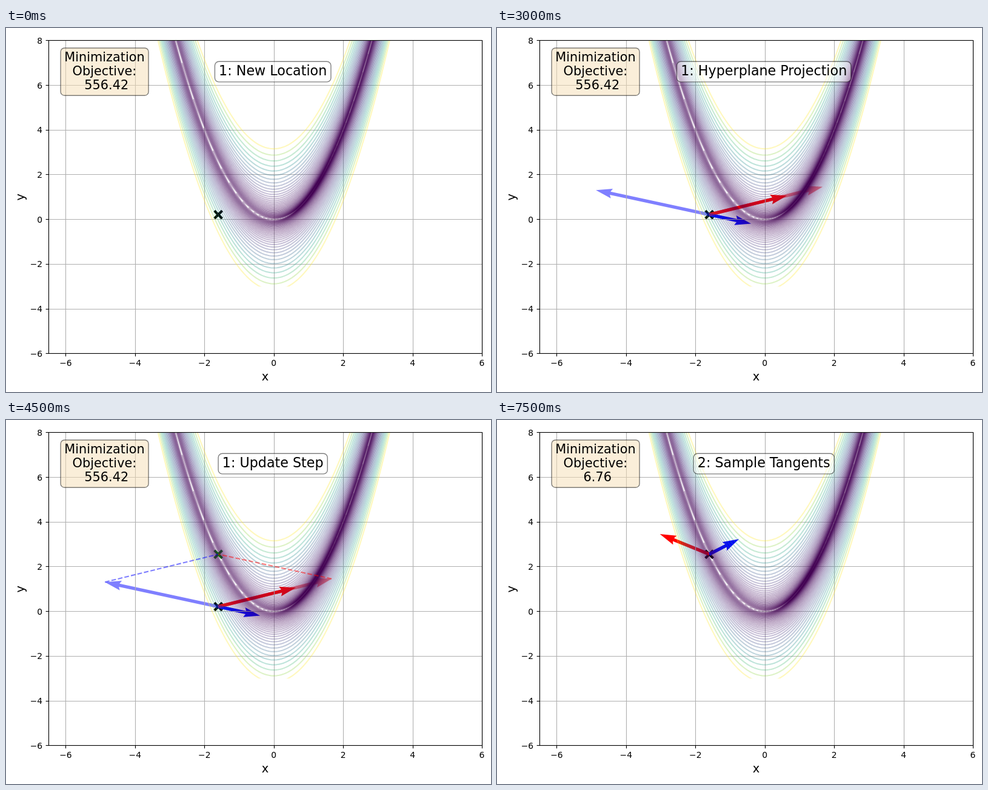
An HTML page with a canvas that plays this animation: 800x600 px, repeating every 8 s.

```html
<!DOCTYPE html>
<html lang="en">
<head>
<meta charset="utf-8">
<title>Hyperplane projection steps</title>
<style>
  html, body { margin: 0; width: 100%; height: 100%; overflow: hidden; background: #fff; }
  canvas { display: block; }
</style>
</head>
<body>
<canvas id="stage" width="800" height="600"></canvas>
<script>
const W = 800, H = 600, LOOP = 8000, STEP = 1500;
const PT = 100 / 72;
const FONT = '"DejaVu Sans", sans-serif';
const box = { left: 69.8, right: 785, top: 20.75, bottom: 536.75 };
const px = x => box.left + (x + 6.5) / 12.5 * (box.right - box.left);
const py = y => box.bottom - (y + 6) / 14 * (box.bottom - box.top);
const snapX = x => Math.floor(x + 0.5) + 0.5;
const snapY = y => Math.floor(y) + 0.5;

const ctx = document.getElementById('stage').getContext('2d');

const VIRIDIS = [
  [68, 1, 84], [71, 45, 123], [59, 82, 139], [44, 114, 142], [33, 145, 140],
  [40, 174, 128], [94, 201, 98], [173, 220, 48], [253, 231, 37]
];

function viridis(v) {
  const s = v * (VIRIDIS.length - 1);
  const i = Math.min(VIRIDIS.length - 2, Math.floor(s));
  const mix = VIRIDIS[i].map((c, k) => Math.round(c + (VIRIDIS[i + 1][k] - c) * (s - i)));
  return `rgb(${mix})`;
}

function line(c, x1, y1, x2, y2) {
  c.beginPath();
  c.moveTo(x1, y1);
  c.lineTo(x2, y2);
  c.stroke();
}

function label(c, str, x, y, pt, align = 'center') {
  c.font = `${pt * PT}px ${FONT}`;
  c.textAlign = align;
  c.fillStyle = '#000';
  c.fillText(str, x, y);
}

function drawGrid(c) {
  c.strokeStyle = '#b0b0b0';
  c.lineWidth = 0.8 * PT;
  for (let v = -6; v <= 6; v += 2) {
    const x = snapX(px(v)), y = snapY(py(v));
    line(c, x, box.top, x, box.bottom);
    line(c, box.left, y, box.right, y);
  }
}

// Level sets of (1-x)^2 + 100(y-x^2)^2, traced by angle.
function drawContours(c) {
  const count = 50, samples = 3000;
  c.save();
  c.beginPath();
  c.rect(box.left, box.top, box.right - box.left, py(-3) - box.top);
  c.clip();
  c.globalAlpha = 0.3;
  c.lineWidth = 1.5 * PT;
  c.lineJoin = 'round';
  for (let i = 0; i < count; i++) {
    const level = 10 ** (-1 + 4 * i / (count - 1));
    const r = Math.sqrt(level);
    c.strokeStyle = viridis(level / 1000);
    c.beginPath();
    let drawing = false;
    for (let k = 0; k <= samples; k++) {
      const a = k / samples * 2 * Math.PI;
      const x = 1 + r * Math.cos(a);
      if (Math.abs(x) > 4.5) { drawing = false; continue; }
      const X = px(x), Y = py(x * x + r / 10 * Math.sin(a));
      if (drawing) c.lineTo(X, Y); else c.moveTo(X, Y);
      drawing = true;
    }
    c.stroke();
  }
  c.restore();
}

function drawAxes(c) {
  const l = snapX(box.left), r = snapX(box.right);
  const t = snapY(box.top), b = snapY(box.bottom);
  const tick = 3.5 * PT;
  const name = v => String(v).replace('-', '\u2212');
  c.strokeStyle = '#000';
  c.lineWidth = 0.8 * PT;
  c.strokeRect(l, t, r - l, b - t);
  for (let v = -6; v <= 8; v += 2) {
    const y = snapY(py(v));
    line(c, l - tick, y, l, y);
    label(c, name(v), 60.1, py(v) + 5.1, 10, 'right');
    if (v > 6) continue;
    const x = snapX(px(v));
    line(c, x, b, x, b + tick);
    label(c, name(v), px(v), 557, 10);
  }
  label(c, 'x', 427.4, 581, 14);
  c.save();
  c.translate(29.5, 278.8);
  c.rotate(-Math.PI / 2);
  label(c, 'y', 0, 0, 14);
  c.restore();
}

function makePlot() {
  const layer = document.createElement('canvas');
  layer.width = W;
  layer.height = H;
  const c = layer.getContext('2d');
  drawGrid(c);
  drawContours(c);
  drawAxes(c);
  return layer;
}

function cross(p, color) {
  const s = 6.4;
  ctx.strokeStyle = color;
  ctx.lineWidth = 3 * PT;
  line(ctx, p.x - s, p.y - s, p.x + s, p.y + s);
  line(ctx, p.x - s, p.y + s, p.x + s, p.y - s);
}

function arrow(p, [dx, dy], color) {
  const w = 5.36, len = Math.hypot(dx, dy);
  const neck = len - 4.5 * w, barb = len - 5 * w;
  ctx.save();
  ctx.translate(p.x, p.y);
  ctx.rotate(Math.atan2(dy, dx));
  ctx.fillStyle = color;
  ctx.beginPath();
  ctx.moveTo(0, -w / 2);
  ctx.lineTo(neck, -w / 2);
  ctx.lineTo(barb, -1.5 * w);
  ctx.lineTo(len, 0);
  ctx.lineTo(barb, 1.5 * w);
  ctx.lineTo(neck, w / 2);
  ctx.lineTo(0, w / 2);
  ctx.closePath();
  ctx.fill();
  ctx.restore();
}

function dashed(p, [dx, dy], end, color) {
  const lw = 1.5 * PT;
  ctx.save();
  ctx.strokeStyle = color;
  ctx.lineWidth = lw;
  ctx.setLineDash([3.7 * lw, 1.6 * lw]);
  line(ctx, p.x + dx, p.y + dy, end.x, end.y);
  ctx.restore();
}

function panel(x, y, w, h, r, fill) {
  ctx.beginPath();
  ctx.roundRect(x, y, w, h, r);
  ctx.fillStyle = fill;
  ctx.fill();
  ctx.strokeStyle = 'rgba(0,0,0,0.5)';
  ctx.lineWidth = PT;
  ctx.stroke();
}

function drawTitle(str) {
  const pad = 0.3 * 16 * PT, mid = 440.2;
  ctx.font = `${16 * PT}px ${FONT}`;
  const w = ctx.measureText(str).width + 2 * pad;
  panel(mid - w / 2, 55.3, w, 33.6, pad, 'rgba(255,255,255,0.5)');
  label(ctx, str, mid, 78, 16);
}

function drawObjective(value) {
  panel(90.1, 33, 145, 78.2, 0.3 * 15 * PT, 'rgba(245,222,179,0.5)');
  label(ctx, 'Minimization', 162.4, 55.3, 15);
  label(ctx, 'Objective:', 162.4, 78, 15);
  label(ctx, value, 165.8, 100.8, 15);
}

const RED = '#f00', BLUE = '#00f';
const PALE_RED = 'rgba(255,0,0,0.5)', PALE_BLUE = 'rgba(0,0,255,0.5)';
const first = { x: px(-1.6), y: py(0.2155) };
const second = { x: px(-1.6), y: py(2.56) };
const rounds = [
  { at: first, value: '556.42', red: [128, -31.4], blue: [69, 14.8],
    redProj: [187, -45.9], blueProj: [-187, -40.5], next: second },
  { at: second, value: '6.76', red: [-81.5, -33.2], blue: [49, -25] }
];
const phases = ['New Location', 'Sample Tangents', 'Hyperplane Projection', 'Update Step'];
const plot = makePlot();

function draw(step) {
  const n = Math.floor(step / phases.length), phase = step % phases.length;
  const r = rounds[n];
  ctx.fillStyle = '#fff';
  ctx.fillRect(0, 0, W, H);

  cross(r.at, '#000');
  if (phase === 3) cross(r.next, '#008000');
  if (phase >= 1) {
    arrow(r.at, r.red, RED);
    arrow(r.at, r.blue, BLUE);
  }
  if (phase >= 2) {
    arrow(r.at, r.redProj, PALE_RED);
    arrow(r.at, r.blueProj, PALE_BLUE);
  }
  ctx.drawImage(plot, 0, 0);
  if (phase === 3) {
    dashed(r.at, r.redProj, r.next, PALE_RED);
    dashed(r.at, r.blueProj, r.next, PALE_BLUE);
  }
  drawObjective(r.value);
  drawTitle(`${n + 1}: ${phases[phase]}`);
}

let shown = -1;
function tick() {
  const step = Math.floor(performance.now() % LOOP / STEP);
  if (step !== shown) draw(shown = step);
  requestAnimationFrame(tick);
}
tick();
</script>
</body>
</html>
```
